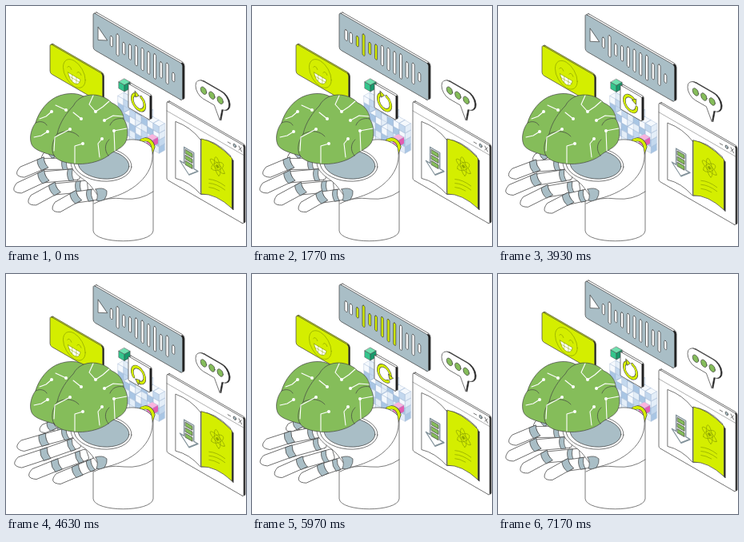
Recreate the animation shown at these times as an HTML page. Size 300 by 300 pixels, loop 7210 ms.

```html
<!DOCTYPE html>
<html lang="en">
<head>
<meta charset="utf-8">
<style>
html, body { margin: 0; width: 100%; height: 100%; overflow: hidden; background: #fff; }
svg { display: block; width: 100vw; height: 100vh; }
</style>
</head>
<body>
<svg id="stage" viewBox="0 0 300 300" fill="none" stroke="#444" stroke-width=".7" stroke-linecap="round" stroke-linejoin="round"></svg>
<script>
const INK = '#111', LINE = '#444', GRAY = '#a9bec6', LIME = '#d4ee00', GREEN = '#85bd5a', OLIVE = '#8fa600';
const stage = document.getElementById('stage');
const path = (d, fill = 'none', extra = '') => `<path d="${d}" fill="${fill}" ${extra}/>`;
const rect = (x, y, w, h, r, fill, extra = '') =>
  `<rect x="${x}" y="${y}" width="${w}" height="${h}" rx="${r}" fill="${fill}" ${extra}/>`;
const dot = (x, y, r, fill, extra = '') => `<circle cx="${x}" cy="${y}" r="${r}" fill="${fill}" ${extra}/>`;
const ellipse = (x, y, rx, ry, turn, fill) =>
  `<ellipse rx="${rx}" ry="${ry}" fill="${fill}" transform="translate(${x} ${y}) rotate(${turn})"/>`;
const group = (id, body) => `<g id="${id}">${body}</g>`;
// Upright isometric plane with its top left corner at x, y
const plane = (x, y, body) => `<g transform="matrix(.866 .5 0 1 ${x} ${y})">${body}</g>`;
// Board with a light top edge and a dark right side
const slab = (w, h, r, fill, depth, top = '#fff') =>
  rect(depth, -depth, w, h, r, top) +
  path(`M${w - r} 1l${depth} ${-depth}q${r} 0 ${r} ${r}V${h - depth - r}q0 ${r} ${-r} ${r}l${-depth} ${depth}z`, INK) +
  rect(0, 0, w, h, r, fill);

function cubeWall() {
  const tones = ['#c3d8ee', '#e4eef8', '#a9c6e4', '#f5f9fd'];
  const cube = (x, y, top, left, right) =>
    path(`M${x} ${y - 8}l7 4-7 4-7-4z`, top) +
    path(`M${x - 7} ${y - 4}l7 4v8l-7-4z`, left) +
    path(`M${x + 7} ${y - 4}l-7 4v8l7-4z`, right);
  let out = '';
  for (let col = 0; col < 7; col++)
    for (let row = 8; row >= 0; row--) {
      const x = 147 + col * 7.4, y = 108 + col * 4.3 + row * 8.5;
      const hash = (col * 5 + row * 3) % 4;
      if (y > 177 || y < (col > 4 ? 141 : 112) || (col * 3 + row) % 7 === 5) continue;
      out += cube(x, y, tones[3], tones[hash], tones[(hash + 1) % 3]);
    }
  out += cube(183, 168, '#f9b4dd', '#f07cc6', '#e35cb2');
  return `<g stroke="#9fb6d4" stroke-width=".4">${out}</g>` +
    group('gem', `<g stroke-width=".5">${cube(148, 99, '#6fe0ae', '#34c58c', '#179a6b')}</g>`);
}

const HEIGHTS = [13, 27, 15, 19, 25, 28, 28, 31, 20, 26, 11];
const player = plane(109, 8,
  slab(129, 46, 3, GRAY, 2.5) +
  path('M7 15v16l13-6z', '#fff', 'id="play"') +
  group('pause', rect(8, 17, 4, 13, 1.5, '#fff') + rect(15, 17, 4, 13, 1.5, '#fff')) +
  group('bars', HEIGHTS.map((h, i) => rect(24.5 + i * 8.95, 23 - h / 2, 3.6, h, 1.7, '#fff')).join('')));

const smiley = plane(55, 47,
  slab(76, 37, 3, LIME, 1.6, LIME) +
  `<g stroke="${OLIVE}">` + dot(35, 20, 16, LIME) +
  path('M25 17q3-5 6 0M39 17q3-5 6 0') +
  path('M26 23h18q-2 9-9 9t-9-9z', '#fff') +
  path('M27 27h16M32 23v8M38 23v8', 'none', 'stroke-width=".5"') + '</g>');

const ring = 'M4 -8.1A9 9 0 1 1 -4 -8.1';
const card = plane(153, 97,
  slab(31, 30, 1, '#fff', 2.5) +
  group('spin',
    path(ring, 'none', 'stroke-width="4"') + path(ring, 'none', `stroke="${LIME}" stroke-width="2.8"`) +
    path('M-5 -11.5l6 3-5 4z', LIME)));

const bubble = 'M11 0h25a11 11 0 0 1 2 22l-3 15-8-15H11a11 11 0 0 1 0-22z';
const chat = plane(237, 88.5,
  path(bubble, INK, 'transform="translate(1.8 -.8)"') + path(bubble, '#fff') +
  [11.5, 23.5, 35.5].map(x => dot(x, 11.5, 4.3, GREEN)).join(''));

const windowPanel = plane(201, 119,
  slab(111, 98, 2, '#fff', 2) +
  path('M0 12H111', 'none', 'stroke-width=".4"') +
  path('M88 7h4M104 4l4 5m0-5l-4 5') + dot(98, 6.5, 2, GRAY) +
  path('M13 19Q35 15 49 24Q67 13 92 22V84Q69 78 49 92Q33 84 13 90z', '#fff') +
  path('M94 25l2 1V88l-2-1z', INK) +
  path('M50 22Q70 15 94 24V87Q71 80 50 91z', LIME) +
  path('M49 23V91') +
  `<g stroke="${OLIVE}">` +
  [20, 80, 140].map(turn => ellipse(73, 45, 11, 4, turn, 'none')).join('') + dot(73, 45, 1.8, OLIVE) +
  path('M61 67q11-5 23-3M61 72q11-5 23-3M61 77q7-3 15-3') + '</g>' +
  path('M25 45h14v20h6L32 76 19 65h6z', '#fff', 'stroke="#82929a" stroke-width="1.6"') +
  [47, 54, 61].map(y => rect(27, y, 10, 5, 0, GREEN)).join(''));

// Two-part finger from its base over the joint to the tip; both parts can turn
function finger(x, y, jointX, jointY, tipX, tipY, w = 14) {
  const near = Math.hypot(jointX - x, jointY - y), far = Math.hypot(tipX - jointX, tipY - jointY);
  const turn = (dx, dy) => Math.atan2(dy, dx) * 180 / Math.PI;
  const angle = turn(jointX - x, jointY - y);
  const bend = turn(tipX - jointX, tipY - jointY) - angle;
  const half = w / 2;
  const band = (at, size) => path(`M${at} ${-half}q3 ${half} 0 ${w}h${size}q3 ${-half} 0 ${-w}z`, GRAY);
  return `<g transform="translate(${x} ${y}) rotate(${angle})"><g class="near">` +
    rect(0, -half, near, w, 3, '#fff') + band(8, 6) +
    `<g transform="translate(${near}) rotate(${bend})"><g class="far">` +
    path(`M-4 ${-half}H${far - half}q${w} ${half} 0 ${w}H-4z`, '#fff') + band(-6, 9) +
    '</g></g></g></g>';
}

const lobe = 'M164 178C166 164 181 163 184 176L180 187';
const arm =
  path('M109 222V281C111 298 182 298 184 281V180L150 200z', '#fff') +
  path('M110 247Q126 238 148 241Q168 243 184 232') +
  path(lobe, 'none', 'stroke-width="5"') + path(lobe, 'none', `stroke="${LIME}" stroke-width="3.6"`);
const fingers =
  finger(80, 194, 56, 190, 42, 196, 11) +
  finger(85, 197, 46, 208, 14, 217) +
  finger(92, 210, 48, 226, 11, 238) +
  finger(102, 225, 62, 240, 29, 253) +
  finger(116, 235, 88, 247, 59, 259);
const palm =
  path('M82 192C90 177 114 170 136 172C150 165 171 164 182 177C189 206 164 232 126 241C114 243 113 230 100 219C88 211 78 202 82 192z', '#fff') +
  path('M112 229q9-3 14 2q1 5-3 11q-6 3-10 1q3-7-1-14z', GRAY) +
  ellipse(121, 198, 36, 21, 5, '#fff') + ellipse(122, 198, 32, 18, 5, GRAY);

const traces = [
  'M35 164l9-2 8-5', 'M42 141l8-3 7-6', 'M62 124l13 6', 'M60 181l1-17 19-10',
  'M86 196v-21l10-3', 'M109 112l-5 11 8 9', 'M129 119l-8 7-9 6', 'M146 138l-12-1-11 6',
  'M151 153l-16 3', 'M136 181l-1-25', 'M84 133l10 8', 'M117 189l-2-17 5-6'
];
const traceEnds = [[52, 157], [57, 132], [75, 130], [80, 154], [96, 172], [112, 132],
  [123, 143], [135, 156], [94, 141], [120, 166]];
const brain =
  path('M60 187C48 184 35 180 32 173C28 163 33 151 37 146C41 132 52 117 67 112C79 108 90 109 97 113C110 108 125 113 132 121C142 125 147 134 147 141C152 148 154 162 149 171C144 179 134 181 128 187C117 195 99 199 84 197C73 196 64 193 60 187z', GREEN) +
  path('M60 187C55 179 59 166 64 160C67 145 77 132 84 125C87 119 92 115 97 113M37 146C43 143 49 145 51 149M64 160C75 154 86 157 91 163M128 187C122 180 124 171 129 167M147 141C139 139 132 143 130 149') +
  `<g stroke="#fff" stroke-width="1.1">${traces.map(d => path(d)).join('')}</g>` +
  traceEnds.map(([x, y]) => dot(x, y, 2, '#fff', 'stroke="none"')).join('');

stage.innerHTML = group('player', player) + group('smiley', smiley) + cubeWall() +
  group('card', card) + group('window', windowPanel) + group('chat', chat) +
  arm + fingers + palm + brain;

const el = id => document.getElementById(id);
const bars = [...el('bars').children];
const sink = (id, y) => el(id).setAttribute('transform', `translate(0 ${y})`);
const rotate = (selector, angle) => document.querySelectorAll(selector)
  .forEach(part => part.setAttribute('transform', `rotate(${angle})`));

function draw(now) {
  const t = (now % 7210) % 3605;
  // Everything floats down and back twice per player run
  const drop = (1 - Math.cos(t / 1802.5 * Math.PI * 2)) / 2;
  ['player', 'smiley', 'card', 'window', 'chat'].forEach(id => sink(id, drop * 6));
  sink('gem', drop * 1.5);
  rotate('.near', 15 * (1 - drop));
  rotate('.far', -22 * (1 - drop));
  el('spin').setAttribute('transform', `translate(14.5 16) rotate(${t / 1802.5 * 360})`);

  const playing = t > 1100 && t < 3400;
  el('play').style.display = playing ? 'none' : '';
  el('pause').style.display = playing ? '' : 'none';
  const done = playing ? Math.floor((t - 1100) / 160) : 0;
  bars.forEach((bar, i) => bar.setAttribute('fill', i < done ? LIME : '#fff'));
}

const start = performance.now();
function tick() {
  draw(performance.now() - start);
  requestAnimationFrame(tick);
}
tick();
</script>
</body>
</html>
```
